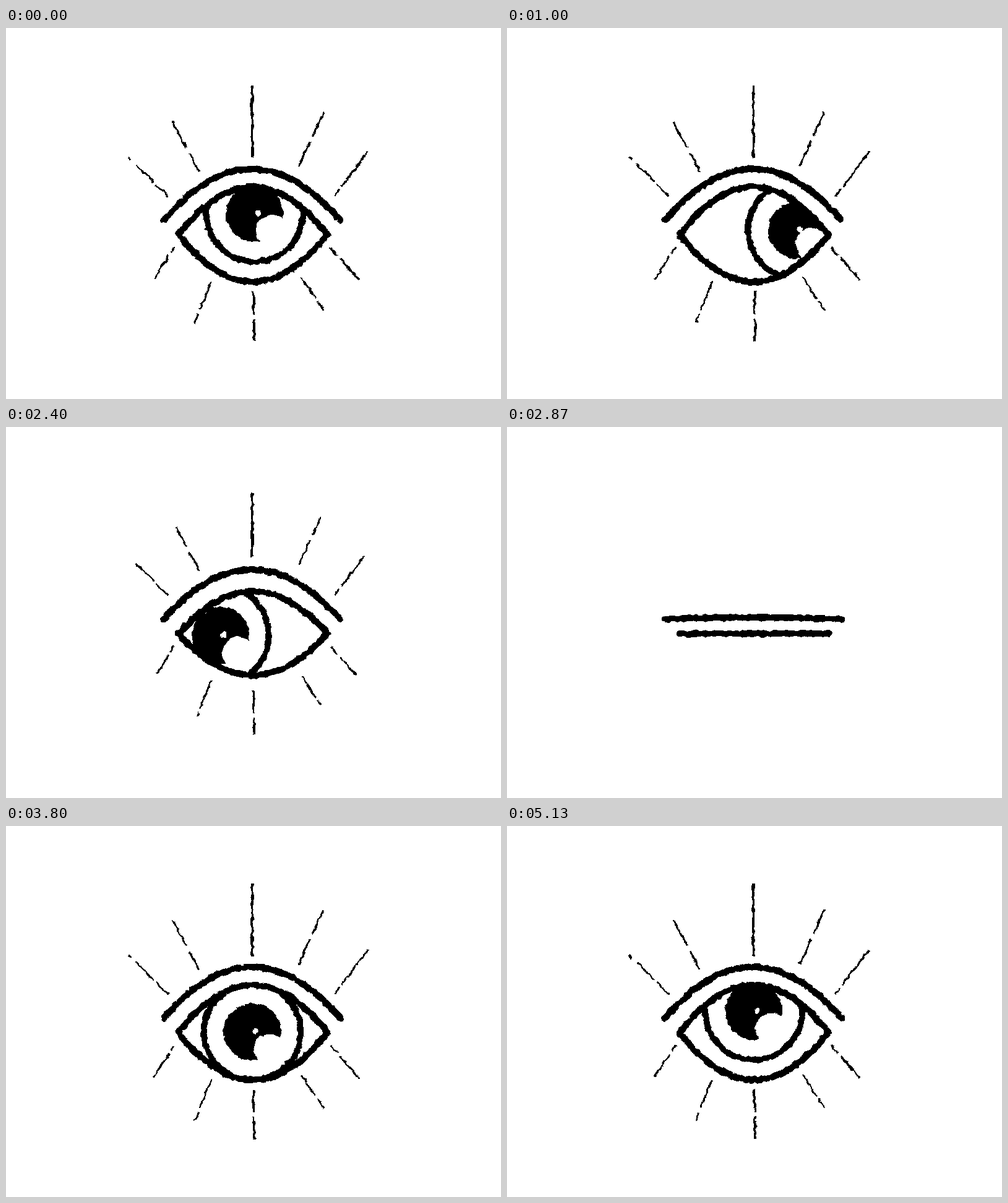
Write an HTML page with a canvas that moves like this. It is 800 by 600 pixels and loops after 5190 ms.

```html
<!DOCTYPE html>
<html lang="en">
<head>
<meta charset="utf-8">
<title>Eye</title>
<style>
  html, body { margin: 0; width: 100%; height: 100%; overflow: hidden; background: #fff; }
  canvas { display: block; }
</style>
</head>
<body>
<canvas id="stage" width="800" height="600"></canvas>
<script>
const W = 800, H = 600, LOOP = 5190, FPS = 15, FRAMES = 78;
const out = document.getElementById('stage').getContext('2d');
const sheet = document.createElement('canvas');
sheet.width = W;
sheet.height = H;
const ctx = sheet.getContext('2d', { willReadFrequently: true });
const result = out.createImageData(W, H);
const pixels = new Uint32Array(result.data.buffer);

// Inner end, outer end, line width, then drawn spans as fractions of the length
const rays = [
  [398, 210, 398, 93, 3.6, [0, 0.74]],
  [398, 210, 398, 93, 4.8, [0.72, 1]],
  [473, 224, 513, 135, 3.2, [0, 0.46], [0.56, 1]],
  [312, 232, 269, 152, 3.1, [0, 0.36], [0.48, 1]],
  [531, 272, 585, 200, 3.1, [0, 0.15], [0.21, 1]],
  [262, 272, 198, 209, 2.9, [0, 0.3], [0.37, 0.82], [0.93, 1]],
  [400, 426, 401, 507, 3.7, [0, 0.45], [0.54, 1]],
  [332, 409, 305, 477, 3, [0, 0.69], [0.79, 1]],
  [478, 403, 514, 457, 3, [0, 0.64], [0.7, 1]],
  [524, 355, 571, 408, 3.2, [0, 0.25], [0.33, 1]],
  [272, 354, 239, 406, 3.2, [0, 0.2], [0.28, 1]]
];

const mix = (a, b, k) => a + (b - a) * k;

function ease(n, start, end) {
  const k = Math.min(1, Math.max(0, (n - start) / (end - start)));
  return (1 - Math.cos(Math.PI * k)) / 2;
}

const blink = (n, lag) => 1 - ease(n, 34 + lag, 43 + lag) + ease(n, 43 + lag, 52 + lag);

// Up, around to the right, across to the left, centre, up again
function gaze(n) {
  if (n >= 76) n -= FRAMES;
  if (n <= 15) {
    const a = ease(n, -2, 15) * Math.PI / 2;
    return [398 + 70 * Math.sin(a), 327 - 27 * Math.cos(a)];
  }
  if (n <= 32) {
    const k = ease(n, 15, 27.5);
    return [mix(468, 338, k), mix(327, 337, k)];
  }
  const back = ease(n, 32, 48);
  return [mix(338, 398, back), mix(337, 333, back) - 33 * ease(n, 58, 74)];
}

function line(x0, y0, x1, y1, width, color = '#000') {
  ctx.strokeStyle = color;
  ctx.lineWidth = width;
  ctx.beginPath();
  ctx.moveTo(x0, y0);
  ctx.lineTo(x1, y1);
  ctx.stroke();
}

function disc(x, y, r, color) {
  ctx.fillStyle = color;
  ctx.beginPath();
  ctx.arc(x, y, r, 0, 7);
  ctx.fill();
}

function drawRays(open) {
  ctx.lineCap = 'butt';
  for (const [x0, y0, x1, y1, width, ...spans] of rays) {
    for (const [from, to] of spans) {
      const end = Math.min(to, open);
      if (end <= from) continue;
      line(mix(x0, x1, from), mix(y0, y1, from), mix(x0, x1, end), mix(y0, y1, end), width);
    }
  }
}

function drawBrow(open) {
  ctx.lineCap = 'round';
  ctx.lineWidth = 10.5;
  ctx.strokeStyle = '#000';
  ctx.beginPath();
  ctx.moveTo(255.5, 310.5);
  ctx.quadraticCurveTo(397, 310.5 - 165 * open, 540, 310.5);
  ctx.stroke();
}

function lidPath(open) {
  ctx.beginPath();
  ctx.moveTo(279, 334);
  ctx.quadraticCurveTo(398, 334 - 154 * open, 519.5, 334);
  ctx.quadraticCurveTo(398, 334 + 153 * open, 279, 334);
  ctx.closePath();
}

function drawIris(x, y) {
  ctx.strokeStyle = '#000';
  ctx.lineWidth = 10;
  ctx.beginPath();
  ctx.arc(x, y, 78, 0, 7);
  ctx.stroke();
  disc(x, y, 46, '#000');
  const side = Math.max(0, (x - 398) / 70);
  disc(x + 28.5 - 4 * side, y + 28.5 - 6 * side, 26, '#fff');
  disc(x + 5, y - 0.5, 4.6, '#fff');
  line(x - 37, y - 32, x - 25, y - 36.5, 2.6, '#fff');
}

function drawEye(n) {
  const open = blink(n, 0);
  ctx.fillStyle = '#fff';
  ctx.fillRect(0, 0, W, H);
  drawRays(open);
  drawBrow(blink(n, 1));
  if (open > 0.01) {
    ctx.save();
    lidPath(open);
    ctx.clip();
    drawIris(...gaze(n));
    ctx.restore();
  }
  lidPath(open);
  ctx.lineJoin = 'round';
  ctx.lineWidth = 10.5;
  ctx.strokeStyle = '#000';
  ctx.stroke();
}

function randomField(seed, count, amount) {
  let s = seed;
  return Float32Array.from({ length: count }, () => {
    s = (Math.imul(s, 1664525) + 1013904223) >>> 0;
    return (s / 4294967296 * 2 - 1) * amount;
  });
}

// Shift every pixel by smooth noise and keep hard black edges
function roughen(n) {
  const cell = 5, cols = W / cell + 2, rows = H / cell + 2;
  const fx = randomField(n * 7919 + 17, cols * rows, 1.9);
  const fy = randomField(n * 104729 + 71, cols * rows, 1.9);
  const ink = ctx.getImageData(0, 0, W, H).data;
  const sample = (f, i, u, v) =>
    mix(mix(f[i], f[i + 1], u), mix(f[i + cols], f[i + cols + 1], u), v);
  pixels.fill(0xffffffff);
  for (let y = 80; y < 520; y++) {
    const row = Math.floor(y / cell), v = y / cell - row;
    for (let x = 185; x < 600; x++) {
      const col = Math.floor(x / cell), u = x / cell - col, i = row * cols + col;
      const sx = Math.round(x + sample(fx, i, u, v));
      const sy = Math.round(y + sample(fy, i, u, v));
      if (ink[(sy * W + sx) * 4] < 128) pixels[y * W + x] = 0xff000000;
    }
  }
  out.putImageData(result, 0, 0);
}

let shown = -1;
const began = performance.now();

function tick() {
  const t = (performance.now() - began) % LOOP;
  const n = Math.min(FRAMES - 1, Math.floor((t + 4) * FPS / 1000));
  if (n !== shown) {
    shown = n;
    drawEye(n);
    roughen(n);
  }
  requestAnimationFrame(tick);
}
tick();
</script>
</body>
</html>
```
